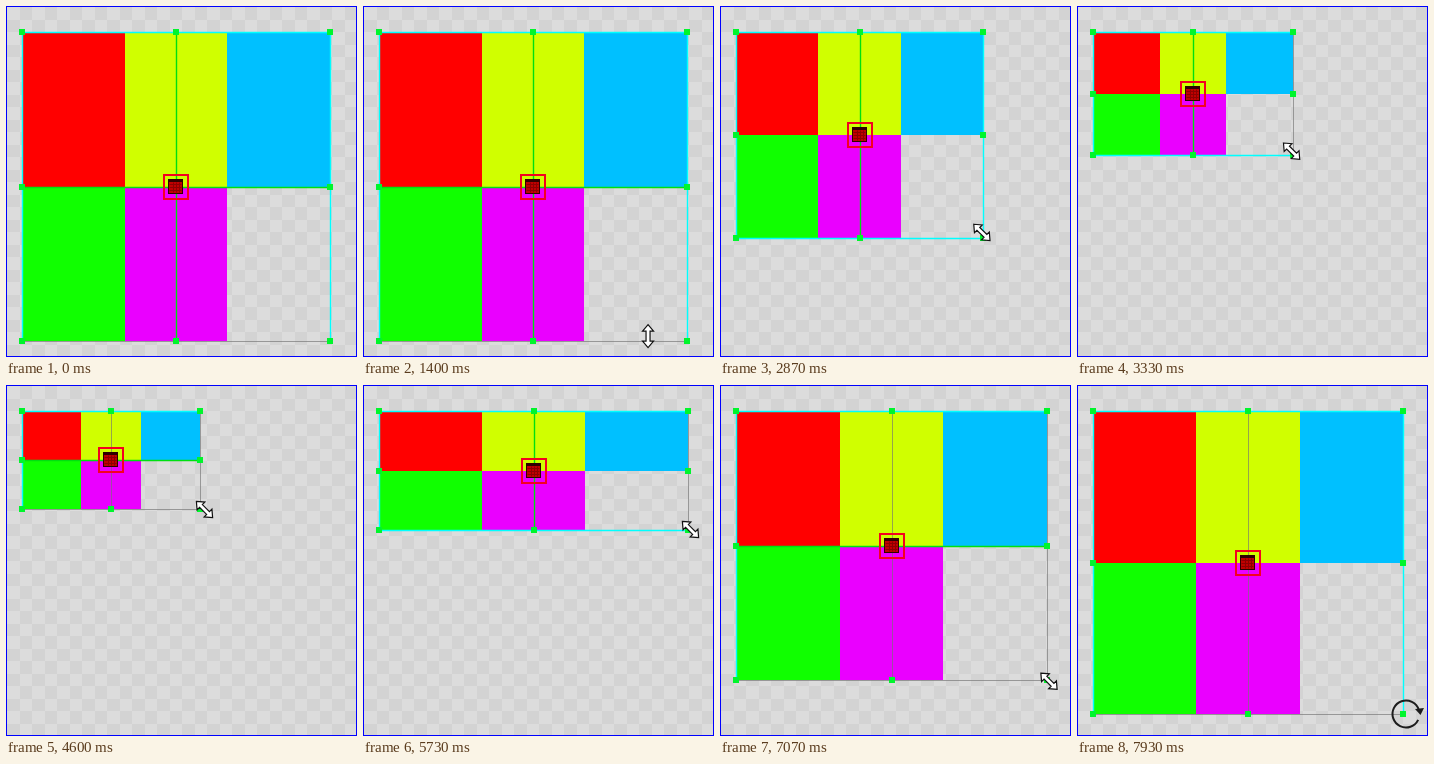
These frames come from a looping animation (351x351 px, 8000 ms). An HTML page with a canvas:

```html
<!DOCTYPE html>
<html lang="en">
<head>
<meta charset="utf-8">
<title>Scaling a layer</title>
<style>
html, body { margin: 0; width: 100%; height: 100%; overflow: hidden; }
canvas { display: block; width: 351px; height: 351px; }
</style>
</head>
<body>
<canvas width="351" height="351"></canvas>
<script>
const SIZE = 351, LOOP = 8000, STEP = 1000 / 15;
const LEFT = 16, TOP = 26;
const canvas = document.querySelector('canvas');
const ctx = canvas.getContext('2d');

// [time, corner x, corner y, bright lines: Vertical, Horizontal, Right, Bottom]
const cornerKeys = [
  [0, 324, 335, 'VHR'], [2330, 324, 335, 'VHR'], [2470, 308, 312, 'VRB'],
  [3130, 234, 179, 'VRB'], [3330, 216, 149, 'VB'], [3600, 188, 122, 'VB'],
  [4000, 165, 106, 'HB'], [4330, 174, 116, 'H'], [4600, 194, 124, 'H'],
  [4870, 238, 137, 'VB'], [5200, 288, 143, 'VB'], [5730, 325, 145, 'VB'],
  [6000, 325, 145, 'VB'], [6330, 325, 196, 'VH'], [6800, 326, 274, 'H'],
  [7070, 327, 295, 'H'], [7330, 327, 317, 'HR'], [7600, 326, 329, 'R'],
  [8000, 326, 329, 'R']
];

// [time, x, y, cursor kind]
const cursorKeys = [
  [0, 370, 336, ''], [130, 341, 334, 'rotate'], [270, 275, 327, 'rotate'],
  [530, 147, 335, 'rotate'], [730, 150, 335, 'rotate'], [930, 170, 333, 'vertical'],
  [1330, 270, 328, 'vertical'], [1530, 313, 334, 'vertical'], [1600, 325, 334, 'rotate'],
  [1870, 331, 335, 'rotate'], [2130, 327, 334, 'diagonal'], [2330, 327, 334, 'diagonal'],
  [2470, 307, 305.5, 'diagonal'], [3130, 232, 174, 'diagonal'], [3330, 215, 145.5, 'diagonal'],
  [3600, 188, 119, 'diagonal'], [4000, 166, 106, 'diagonal'], [4330, 177, 117, 'diagonal'],
  [4600, 198.5, 124.5, 'diagonal'], [4870, 244, 137, 'diagonal'], [5200, 293, 143, 'diagonal'],
  [5730, 327.5, 144.5, 'diagonal'], [6000, 327.5, 144.5, 'diagonal'],
  [6330, 327.5, 200, 'diagonal'], [6800, 328, 277, 'diagonal'], [7070, 329, 296.5, 'diagonal'],
  [7330, 329, 319, 'diagonal'], [7600, 328, 328, 'diagonal'], [7790, 328, 328, 'diagonal'],
  [7800, 335, 334, 'rotate'], [7930, 329, 329, 'rotate'], [8000, 329, 329, 'rotate']
];

function sample(keys, t) {
  let i = keys.length - 2;
  while (i > 0 && keys[i][0] > t) i--;
  const a = keys[i], b = keys[i + 1];
  const p = Math.min(1, (t - a[0]) / (b[0] - a[0]));
  return { x: a[1] + (b[1] - a[1]) * p, y: a[2] + (b[2] - a[2]) * p, state: a[3] };
}

function rect(color, x, y, w, h) {
  ctx.fillStyle = color;
  ctx.fillRect(x, y, w, h);
}

function line(color, width, x1, y1, x2, y2) {
  ctx.strokeStyle = color;
  ctx.lineWidth = width;
  ctx.beginPath();
  ctx.moveTo(x1 + .5, y1 + .5);
  ctx.lineTo(x2 + .5, y2 + .5);
  ctx.stroke();
}

function drawBackground() {
  rect('#dcdcdc', 0, 0, SIZE, SIZE);
  const edge = n => Math.round(1 + n * 12.5);
  for (let j = 0; j < 29; j++) {
    for (let i = 0; i < 29; i++) {
      if ((i + j) % 2) rect('#d3d3d3', edge(i), edge(j), edge(i + 1) - edge(i), edge(j + 1) - edge(j));
    }
  }
}

function drawLayer(right, bottom) {
  const colors = ['#ff0000', '#d0ff00', '#00c0ff', '#10ff00', '#ea00ff'];
  const gx = n => Math.round(LEFT + (right - LEFT) * n / 3);
  const gy = n => Math.round(TOP + (bottom - TOP) * n / 2);
  colors.forEach((color, k) => {
    const c = k % 3, r = Math.floor(k / 3);
    rect(color, gx(c), gy(r), gx(c + 1) - gx(c), gy(r + 1) - gy(r));
  });
}

function drawFrame(right, bottom, bright) {
  const mx = Math.round((LEFT + right) / 2), my = Math.round((TOP + bottom) / 2);
  const guide = (flag, color, ...ends) => {
    const on = bright.includes(flag);
    line(on ? color : 'rgba(115,115,115,.65)', on ? 1.4 : 1, ...ends);
  };
  guide('V', '#00e010', mx, TOP, mx, bottom);
  if (bright.includes('H')) line('#00e010', 1.4, LEFT, my, right, my);
  guide('R', '#00ffff', right, TOP, right, bottom);
  guide('B', '#00ffff', LEFT, bottom, right, bottom);
  line('#00ffff', 1.4, LEFT, TOP, right, TOP);
  line('#00ffff', 1.4, LEFT, TOP, LEFT, bottom);

  for (const x of [LEFT, mx, right]) {
    for (const y of [TOP, my, bottom]) {
      if (x !== mx || y !== my) rect('#00f52c', x - 3, y - 3, 6, 6);
    }
  }
  drawPivot(mx, my);
}

function drawPivot(x, y) {
  ctx.strokeStyle = '#f40020';
  ctx.lineWidth = 2;
  ctx.strokeRect(x - 12, y - 12, 24, 24);
  rect('#300000', x - 8, y - 8, 15, 15);
  rect('#c00000', x - 7, y - 5, 13, 11);
  for (let d = -3; d <= 3; d += 3) {
    line('#8c0000', 1, x + d, y - 5, x + d, y + 5);
    line('#8c0000', 1, x - 7, y + d, x + 5, y + d);
  }
}

function drawArrow() {
  const half = [[-11.5, 0], [-5, -5.5], [-5, -2], [5, -2], [5, -5.5], [11.5, 0]];
  ctx.beginPath();
  half.forEach(([x, y]) => ctx.lineTo(x, y));
  half.slice().reverse().forEach(([x, y]) => ctx.lineTo(x, -y));
  ctx.closePath();
  ctx.fillStyle = '#fff';
  ctx.fill();
  ctx.strokeStyle = '#111';
  ctx.lineWidth = 1.2;
  ctx.stroke();
}

function drawRotate() {
  ctx.strokeStyle = '#1c1c1c';
  ctx.lineWidth = 2;
  ctx.beginPath();
  ctx.arc(0, 0, 13.5, .45, Math.PI * 2 - .3);
  ctx.stroke();
  ctx.fillStyle = '#1c1c1c';
  ctx.beginPath();
  ctx.moveTo(9, -5);
  ctx.lineTo(18, -6);
  ctx.lineTo(14.5, 1);
  ctx.fill();
}

function drawCursor({ x, y, state }) {
  if (!state) return;
  ctx.save();
  ctx.translate(x, y);
  if (state === 'rotate') {
    drawRotate();
  } else {
    ctx.rotate(state === 'vertical' ? Math.PI / 2 : Math.PI / 4);
    drawArrow();
  }
  ctx.restore();
}

function draw(t) {
  const time = Math.ceil(Math.floor((t + 4) / STEP) * STEP);
  const corner = sample(cornerKeys, time);
  const right = Math.round(corner.x), bottom = Math.round(corner.y);
  drawBackground();
  drawLayer(right, bottom);
  drawFrame(right, bottom, corner.state);
  drawCursor(sample(cursorKeys, time));
  ctx.strokeStyle = '#0000ff';
  ctx.lineWidth = 1;
  ctx.strokeRect(.5, .5, SIZE - 1, SIZE - 1);
}

const start = performance.now();
function tick() {
  draw((performance.now() - start) % LOOP);
  requestAnimationFrame(tick);
}
tick();
</script>
</body>
</html>
```
